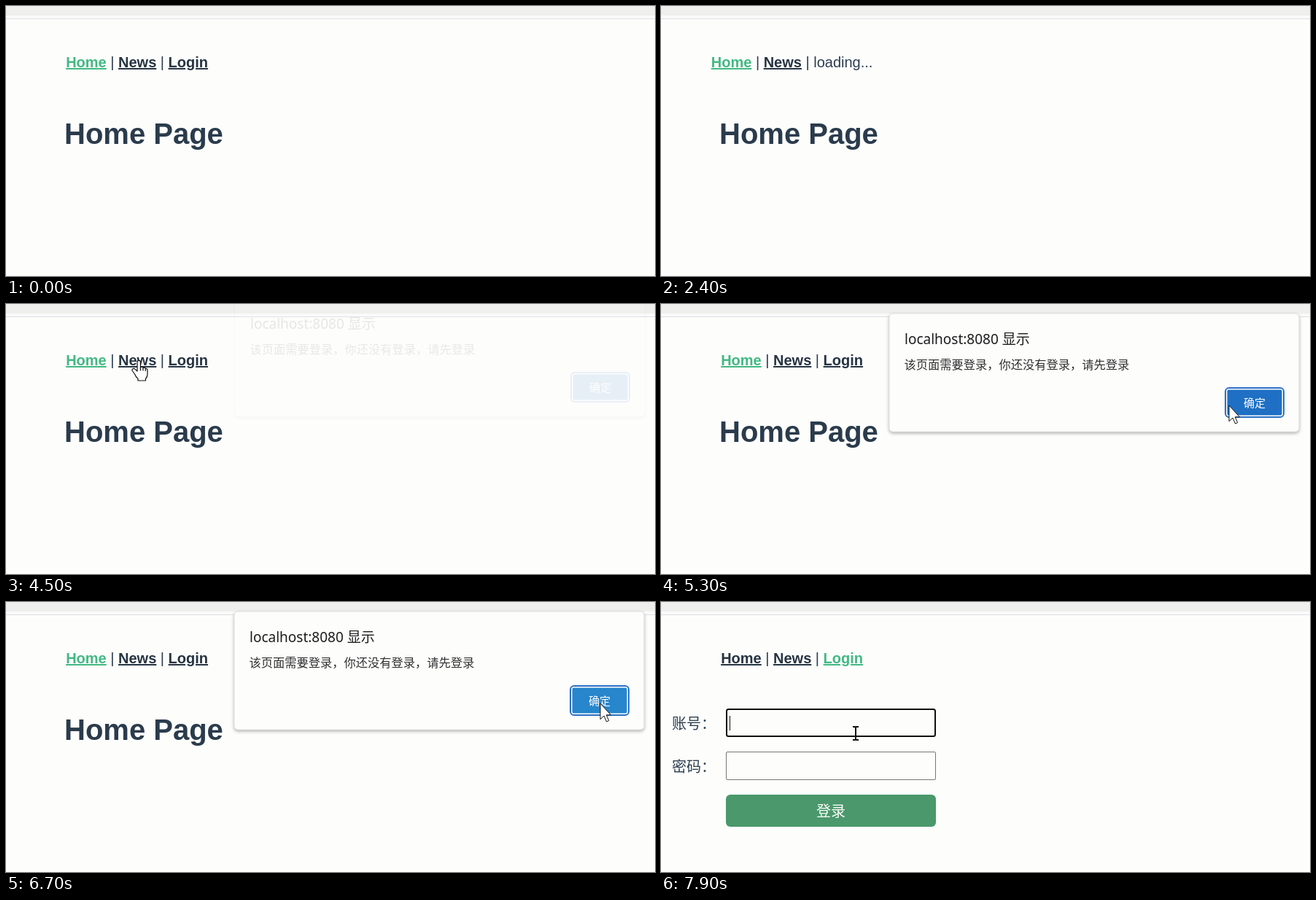
Animation, 890 px wide and 370 px high, one loop 8000 ms. Source, as an HTML page:

```html
<!DOCTYPE html>
<html lang="zh-CN">
<head>
<meta charset="utf-8">
<title>Login guard demo</title>
<style>
  html, body { margin: 0; width: 100%; height: 100%; overflow: hidden; background: #fdfdfc; }
  svg { display: block; }
  text { font-family: "Liberation Sans", Arial, sans-serif; white-space: pre; }
  .nav { font-size: 20px; fill: #2c3e50; text-anchor: middle; }
  .link { font-weight: bold; fill: #263442; text-decoration: underline; }
  .active { fill: #42b983; }
  .heading { font-size: 40px; font-weight: bold; fill: #2a3b4c; }
  .cjk text:not(.nav) { font-family: "Noto Sans", "Noto Sans CJK SC", "Noto Sans CJK", sans-serif; }
  .label { font-size: 20px; fill: #2c3e50; }
  .mid { text-anchor: middle; }

  /* The small negative delay keeps hard changes clear of rounding at their boundaries. */
  .anim { animation: 8s step-end -10ms infinite; }
  .home { animation-name: home; }
  .ready { animation-name: ready; }
  .loading { animation-name: loading; }
  .login { animation-name: login; }
  .dialog { animation-name: dialog; }
  .press { animation-name: press; }
  .cursor { animation-name: move; }
  .arrow { animation-name: arrow; }
  .hand { animation-name: hand; }
  .beam { animation-name: beam; }

  @keyframes home { 0% { visibility: visible; } 86.25%, 100% { visibility: hidden; } }
  @keyframes login { 0% { visibility: hidden; } 86.25%, 100% { visibility: visible; } }
  @keyframes loading {
    0%, 31.25%, 100% { visibility: hidden; }
    16.25% { visibility: visible; }
  }
  @keyframes ready {
    0%, 31.25% { visibility: visible; }
    16.25%, 86.25%, 100% { visibility: hidden; }
  }
  @keyframes dialog {
    0% { opacity: 0; transform: translate(1px, -21px); }
    56.25% { opacity: .1; transform: translate(1px, -21px); }
    57.5% { opacity: .65; transform: translate(0, -7px); }
    58.75% { opacity: 1; transform: none; }
    85% { opacity: .4; transform: none; }
    86.25%, 100% { opacity: 0; transform: none; }
  }
  @keyframes press { 0% { fill: #1f70c4; } 83.75%, 100% { fill: #2786cc; } }
  @keyframes move {
    0% { transform: translate(300px, -40px); }
    30% { transform: translate(300px, -40px); animation-timing-function: steps(5); }
    36.25% { transform: translate(150px, 234px); animation-timing-function: steps(3); }
    40% { transform: translate(104px, 122px); animation-timing-function: steps(6); }
    47.5% { transform: translate(182px, 77px); }
    62.5% { transform: translate(182px, 77px); animation-timing-function: steps(3); }
    66.25% { transform: translate(779px, 139px); animation-timing-function: steps(6); }
    73.75% { transform: translate(822px, 150px); animation-timing-function: steps(6); }
    81.25% { transform: translate(815px, 139px); }
    83.75% { transform: translate(815px, 139px); animation-timing-function: steps(7); }
    92.5%, 100% { transform: translate(267px, 180px); }
  }
  @keyframes arrow {
    0%, 58.75% { visibility: visible; }
    46.25%, 91.25%, 100% { visibility: hidden; }
  }
  @keyframes hand {
    0%, 58.75%, 100% { visibility: hidden; }
    46.25% { visibility: visible; }
  }
  @keyframes beam { 0% { visibility: hidden; } 91.25%, 100% { visibility: visible; } }
</style>
</head>
<body>
<svg width="890" height="370" viewBox="0 0 890 370">
  <defs>
    <filter id="shadow" x="-5%" y="-10%" width="110%" height="125%">
      <feDropShadow dx="0" dy="2" stdDeviation="2" flood-color="#555" flood-opacity=".45"/>
    </filter>
  </defs>

  <rect width="890" height="370" fill="#fdfdfc"/>
  <rect width="890" height="13" fill="#eff0ee"/>
  <rect y="13" width="890" height="4" fill="#fafaf9"/>
  <rect y="17" width="890" height="1" fill="#dedfe6"/>

  <text class="anim ready nav" x="179.6" y="84"><tspan class="link active">Home</tspan> | <tspan class="link">News</tspan> | <tspan class="link">Login</tspan></text>
  <text class="anim loading nav" x="179.6" y="84"><tspan class="link active">Home</tspan> | <tspan class="link">News</tspan> | loading...</text>
  <text class="anim home heading" x="80" y="189">Home Page</text>

  <g class="anim login cjk">
    <text class="nav" x="179.6" y="84"><tspan class="link">Home</tspan> | <tspan class="link">News</tspan> | <tspan class="link active">Login</tspan></text>
    <text class="label" x="15" y="174">账号：</text>
    <text class="label" x="15" y="233">密码：</text>
    <rect x="90" y="147" width="286" height="37" rx="2.5" fill="#fdfdfc" stroke="#101010" stroke-width="2"/>
    <rect x="94" y="156" width="1" height="20" fill="#111"/>
    <rect x="89.5" y="205.5" width="287" height="38" rx="1.5" fill="#fdfdfc" stroke="#767676"/>
    <rect x="89" y="264" width="288" height="44" rx="6" fill="#4a986c"/>
    <text class="mid" x="233" y="294" font-size="20" fill="#fcfcf8">登录</text>
  </g>

  <g class="anim dialog cjk">
    <rect x="313" y="13" width="562" height="162" rx="5" fill="#fdfdfc" stroke="#d8d8d8" stroke-width=".8" filter="url(#shadow)"/>
    <text x="334" y="54.5" font-size="19" fill="#1c1c1c">localhost:8080 显示</text>
    <text x="333.5" y="88.5" font-size="16.25" fill="#303030">该页面需要登录，你还没有登录，请先登录</text>
    <rect x="774" y="115" width="80" height="40" rx="5" fill="#fff" stroke="#2a70c4" stroke-width="2"/>
    <rect class="anim press" x="776.5" y="117.5" width="75" height="35" rx="2"/>
    <text class="mid" x="814" y="141" font-size="15" fill="#fff">确定</text>
  </g>

  <g class="anim cursor" fill="#fff" stroke="#111" stroke-linejoin="round">
    <path class="anim arrow" d="M0 0V21.8L5 17 8.5 25 11.7 23.6 8.3 15.8H14.5Z"/>
    <g class="anim hand" stroke-width="1.2">
      <path transform="translate(-10 -1)" d="M8 16V3.5a2.2 2.2 0 0 1 4.4 0V11a2 2 0 0 1 3.6.6 2 2 0 0 1 3.3 1 1.9 1.9 0 0 1 2.7 1.8V20q0 4-2.5 6.5V29H9V26.5Q6 24 4.5 20L1.2 15.5a2.2 2.2 0 0 1 3.6-2.4Z"/>
      <path transform="translate(-10 -1)" fill="none" d="M12.4 11V15.5M16 12V15.5M19.3 13V16"/>
    </g>
    <path class="anim beam" fill="none" stroke-width="2" d="M-4-9H-1L0-8 1-9H4M0-8V8M-4 9H-1L0 8 1 9H4"/>
  </g>
</svg>
</body>
</html>
```
